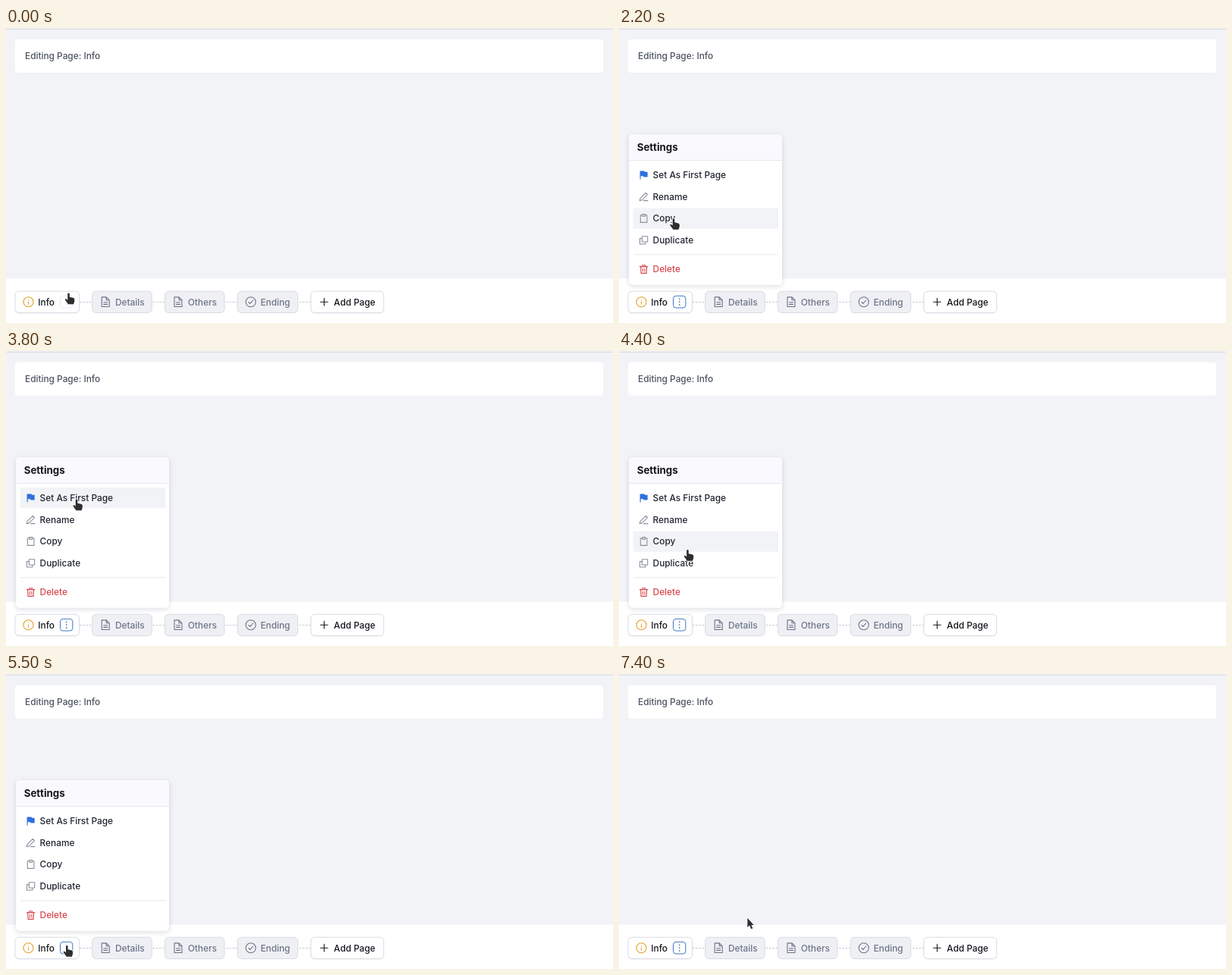
Recreate the animation shown at these times as an HTML page. Size 800 by 389 pixels, loop 7.5 s.

```html
<!DOCTYPE html>
<html lang="en">
<head>
<meta charset="utf-8">
<title>Page settings menu</title>
<style>
  html, body { margin: 0; width: 100%; height: 100%; overflow: hidden; background: #f1f3f7; }
  svg { display: block; width: 800px; height: 389px; }
  text { font: 550 11.85px Inter, "Liberation Sans", sans-serif; white-space: pre; }
  .title { font-size: 13.3px; font-weight: 700; }
  .icon { fill: none; stroke-width: 1.1; stroke-linecap: round; stroke-linejoin: round; }
  .pointer { fill: #2e2e2e; stroke: #fff; stroke-width: 2; stroke-linejoin: round; paint-order: stroke; }
</style>
</head>
<body>
<svg viewBox="0 0 800 389">
  <defs>
    <filter id="soft" x="-20%" y="-20%" width="140%" height="140%">
      <feDropShadow dx="0" dy="2" stdDeviation="3" flood-color="#1c2440" flood-opacity=".15"/>
    </filter>
  </defs>
  <rect width="800" height="389" fill="#f1f3f7"/>
  <rect y="1" width="800" height="1" fill="#d7d9df"/>
  <rect x="12" y="15" width="775" height="44" rx="4" fill="#fff"/>
  <text x="25" y="41.4" fill="#4b5260">Editing Page: Info</text>
  <rect y="330.5" width="800" height="59" fill="#fff"/>
  <path d="M97 361.5H402" stroke="#c3c7cf" stroke-dasharray="2.5 1.7"/>
  <g id="tabs"></g>
  <g id="dots">
    <rect x="71.5" y="353.3" width="16.3" height="15.7" rx="3.6" fill="#fff" stroke="#3a78c4"/>
    <path d="M79.7 357.3v8" stroke="#4a6f9f" stroke-width="1.7" stroke-linecap="round" stroke-dasharray="0 3.8"/>
  </g>
  <g id="menu">
    <rect x="13.3" y="140" width="201.7" height="198.5" rx="5.5" fill="#fff" filter="url(#soft)"/>
    <path d="M13.3 174.5v-29q0-5.5 5.5-5.5H209.5q5.5 0 5.5 5.5v29z" fill="#faf9fe"/>
    <path d="M13.3 174.5H215M19 298.8H210" stroke="#e6e7ed"/>
    <text class="title" x="23.7" y="162.2" fill="#14161c">Settings</text>
    <g id="rows"></g>
  </g>
  <path id="hand" class="pointer" d="M-1.3 1.3a1.3 1.3 0 0 1 2.6 0V5.2L6 6.3Q7.8 6.8 7.8 8.4V10.5L6.6 14.7H-.6L-4.6 9Q-4.8 7.4-3.2 7.8L-1.3 9.2z"/>
  <path id="arrow" class="pointer" d="M0 0V12.3L2.8 9.8L4.9 14.5L7 13.5L5 9.2H8.4z"/>
</svg>
<script>
const LOOP = 7500, TICK = 100;
const $ = id => document.getElementById(id);
const INK = '#14161c', MUTED = '#6b7488', GRAY = '#8b909b', RED = '#d9474d', BLUE = '#2f6fde';

const RING = 'M-6.5 0a6.5 6.5 0 0 1 13 0a6.5 6.5 0 0 1-13 0';
const icons = {
  info: RING + 'M0-.4v3.5M0-3v.1',
  check: RING + 'm3.7.3l1.9 1.9l3.9-4.4',
  doc: 'M1-6.3H-5V6.3H5V-2.4zV-2.4H5M-2.5.6h5M-2.5 3.2h5',
  plus: 'M-4.8 0h9.6M0-4.8v9.6',
  flag: 'M-4.5 5.5V-4.5H.5l1 1.3h3V2.4H.5l-1-1.2h-4',
  pencil: 'M-5.4 5.3l.8-3.1L2.6-5L5-2.7L-2.3 4.5zM0 5.3h5.3',
  clipboard: 'M-2-4.3h-2.3v9.6h8.6v-9.6H2M-2-5.5h4V-3h-4z',
  copies: 'M-2.2-5.1h7.3v7.3h-7.3zv2.9h-2.9v7.3h7.3V2.2',
  trash: 'M-5.2-3.4H5.2M-1.9-3.4v-1.8h3.8v1.8M-4-3.4l.5 8.8h7l.5-8.8M-1.3-.8V3M1.3-.8V3'
};

const icon = (name, x, y, color, fill = 'none') =>
  `<path class="icon" d="${icons[name]}" transform="translate(${x} ${y})" style="stroke:${color};fill:${fill}"/>`;
const label = (text, x, y, color) => `<text x="${x}" y="${y + 4.3}" fill="${color}">${text}</text>`;

// Tabs flow from left to right with a fixed gap.
const TAB_Y = 361.2, TAB_GAP = 17.2;
let left = 12;
function tab(name, pic, width, color, active) {
  const box = (y, paint) => `<rect x="${left}" y="${y}" width="${width}" height="28.3" rx="5" ${paint}/>`;
  const shadow = active ? box(348.2, 'fill="#1c2440" opacity=".07"') : '';
  const markup = shadow + box(347.2, `fill="${active ? '#fff' : '#eff0f4'}" stroke="#d8dbe3"`) +
    icon(pic, left + 17.5, TAB_Y, color) + label(name, left + 30.3, TAB_Y, active ? INK : MUTED);
  left += width + TAB_GAP;
  return markup;
}
$('tabs').innerHTML = [
  tab('Info', 'info', 84.5, '#e2a126', true),
  tab('Details', 'doc', 78.5, MUTED),
  tab('Others', 'doc', 78.5, MUTED),
  tab('Ending', 'check', 79.5, MUTED),
  tab('Add Page', 'plus', 96, INK, true)
].join('');

const ROW_HALF = 13.6;
const rows = [
  ['Set As First Page', 'flag', BLUE],
  ['Rename', 'pencil', GRAY],
  ['Copy', 'clipboard', GRAY],
  ['Duplicate', 'copies', GRAY],
  ['Delete', 'trash', RED]
];
const isDelete = i => i === rows.length - 1;
const rowY = i => 193.6 + 28.75 * i + (isDelete(i) ? 9.4 : 0);
$('rows').innerHTML = rows.map(([name, pic, color], i) =>
  `<rect class="hover" x="18.5" y="${rowY(i) - ROW_HALF}" width="191.7" height="${2 * ROW_HALF}" rx="2" fill="${isDelete(i) ? '#fde0e1' : '#f2f3f6'}"/>` +
  icon(pic, 32.6, rowY(i), color, pic === 'flag' ? color : 'none') +
  label(name, 44.6, rowY(i), isDelete(i) ? color : '#1f2430')
).join('');
const hovers = [...document.querySelectorAll('.hover')];

// Places the pointer visits.
const spot = {
  start: [82.5, 349.5],
  button: [80.3, 358],
  divider: [86, 291.3],
  rename: [58, 211],
  first: [93, 195.5],
  duplicate: [90, 273],
  away: [169.3, 321.8]
};
const moves = [
  ['button', 0, 100],
  ['divider', 1400, 1900],
  ['rename', 2100, 2300],
  ['divider', 2500, 2700],
  ['button', 2700, 3000],
  ['divider', 3000, 3300],
  ['first', 3300, 3600],
  ['duplicate', 3800, 4500],
  ['button', 4500, 5000],
  ['away', 6700, 7400]
];

const progress = (t, from, to) => Math.min(1, Math.max(0, (t - from) / (to - from)));

const pointerAt = t => moves.reduce(([x, y], [name, from, to]) => {
  const k = progress(t, from, to), [toX, toY] = spot[name];
  return [x + (toX - x) * k, y + (toY - y) * k];
}, spot.start);

function render(time) {
  const t = Math.floor((time % LOOP) / TICK) * TICK;
  const [x, y] = pointerAt(t);
  const opacity = progress(t, 1300, 1500) - progress(t, 5900, 6100);
  $('menu').setAttribute('opacity', opacity);
  $('dots').setAttribute('opacity', t < 100 ? .15 : 1);
  hovers.forEach((row, i) => {
    const inside = Math.abs(y + 2.5 - rowY(i)) < ROW_HALF;
    row.setAttribute('opacity', inside ? 1 : 0);
  });
  const free = x > 98;
  $('hand').style.display = free ? 'none' : '';
  $('arrow').style.display = free ? '' : 'none';
  $(free ? 'arrow' : 'hand').setAttribute('transform', `translate(${x} ${y})`);
}

const start = performance.now();
function loop() {
  render(performance.now() - start);
  requestAnimationFrame(loop);
}
loop();
</script>
</body>
</html>
```
